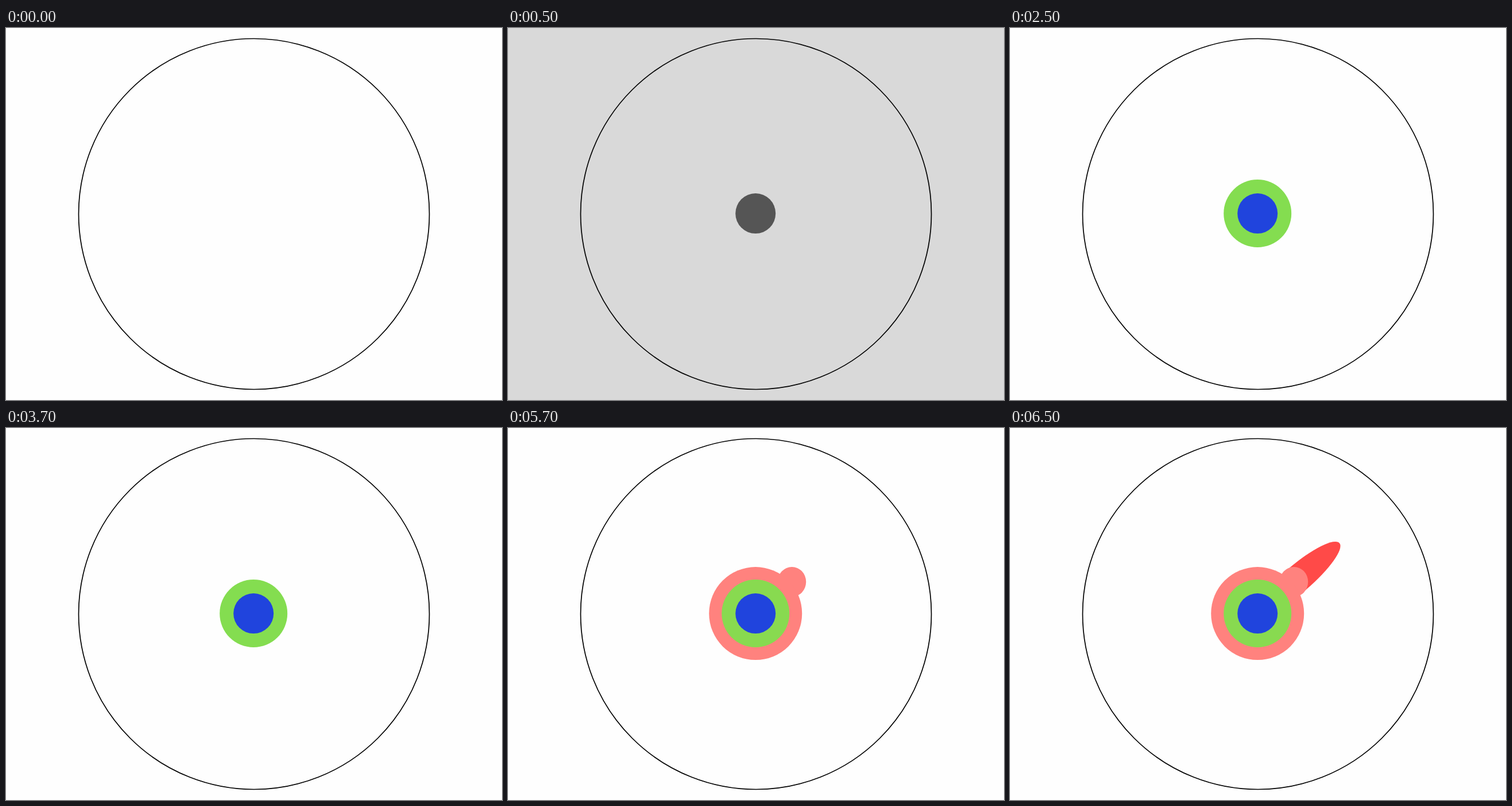
Recreate the animation shown at these times as an HTML page. Size 864 by 648 pixels, loop 8000 ms.

```html
<!DOCTYPE html>
<html lang="en">
<head>
<meta charset="utf-8">
<title>Growing rings</title>
<style>
  html, body { margin: 0; width: 100%; height: 100%; overflow: hidden; background: #fefefe; }
  svg { display: block; width: 100%; height: 100%; }
</style>
</head>
<body>
<svg viewBox="0 0 864 648">
  <rect id="back" width="864" height="648"/>
  <circle cx="432" cy="324" r="305.5" fill="none" stroke="#000" stroke-width="1.7"/>
  <ellipse id="beam" rx="96" ry="23.8" fill="#ff4a48" transform="translate(500.9 262.9) rotate(-40.5)"/>
  <g id="shell" fill="#ff827e">
    <ellipse cx="494.5" cy="268" rx="24.7" ry="26"/>
    <circle cx="431.2" cy="323.1" r="81"/>
  </g>
  <circle id="ring" cx="431.2" cy="323.1" r="59"/>
  <circle id="core" cx="431.2" cy="323.1" r="35"/>
</svg>
<script>
  const LOOP = 8000;
  const [back, beam, shell, ring, core] =
    ["back", "beam", "shell", "ring", "core"].map(id => document.getElementById(id));

  const show = (el, on) => el.setAttribute("visibility", on ? "visible" : "hidden");
  const fill = (el, color) => el.setAttribute("fill", color);

  function draw(t) {
    const gray = t >= 500 && t < 2500;
    fill(back, gray ? "#d9d9d9" : "#fefefe");
    fill(core, gray ? "#555555" : "#2044dd");
    fill(ring, t < 4500 ? "#84dd50" : "#88da50");
    show(core, t >= 500);
    show(ring, t >= 2500);
    show(shell, t >= 4500);
    show(beam, t >= 6500);
  }

  const start = performance.now();
  function tick() {
    draw((performance.now() - start) % LOOP);
    requestAnimationFrame(tick);
  }
  tick();
</script>
</body>
</html>
```
